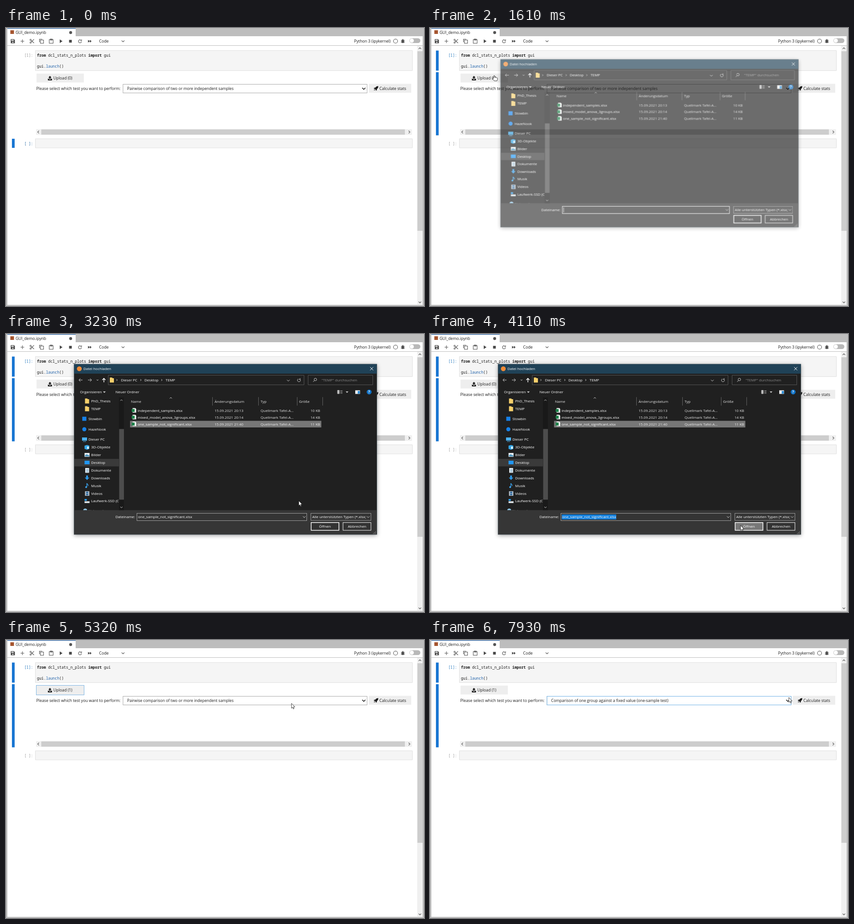
These frames come from a looping animation (918x610 px, 8 s). An HTML page:

```html
<!DOCTYPE html>
<html lang="en">
<head>
<meta charset="utf-8">
<title>Notebook upload demo</title>
<style>
html, body { margin: 0; width: 100%; height: 100%; overflow: hidden; background: #fff; }
svg { display: block; width: 100vw; height: 100vh; }
text { font-family: "Open Sans", "Noto Sans", sans-serif; font-size: 8.7px; fill: #1c1c1c; white-space: pre; }
.mono text { font-family: "Noto Sans Mono", "DejaVu Sans Mono", monospace; font-size: 8.18px; }
.line { fill: none; stroke: #555; stroke-width: 1.1; }
.solid { fill: #4a4a4a; }
.end { text-anchor: end; }
.mid { text-anchor: middle; }

#dialog text { font-size: 8px; fill: #fff; }
#dialog .dim, #dialog .dim text { fill: #b4b4b4; }
#dialog .line { stroke: #d0d0d0; stroke-width: 1; }
#dialog .box { fill: none; stroke: #555; }
#frame { filter: drop-shadow(0 2px 5px rgba(0, 0, 0, .4)); }

/* 1% of the loop is 80 ms */
.anim { animation: 8s step-end infinite; }
.hid { opacity: 0; }
.cell-on { animation-name: show-cell; }
.cell-off { animation-name: hide-cell; }
#prompt1 { fill: #9c9c9c; animation-name: prompt-on; }
#prompt2 { fill: #2f6fa8; animation-name: prompt-off; }
#hover { animation-name: hover; }
#focus { animation-name: focus; }
.before-upload { animation-name: hide-upload; }
.after-upload { animation-name: show-upload; }
#select-focus { animation-name: select-focus; }
.old-test { animation-name: hide-test; }
.new-test { animation-name: show-test; }
#list { animation-name: list; }
#option-bar { animation-name: option; }
#opt1 { fill: #fff; animation-name: option1; }
#opt2 { animation-name: option2; }
#dialog { transform-origin: 481.75px 253px; animation-name: dialog; }
#title-icon { animation-name: hide-icon; }
#title { animation-name: title; }
#row-hover { animation-name: row-hover; }
#row-picked, #filename { animation-name: picked; }
#caret { animation-name: caret; }
#field { stroke: #fff; animation-name: field; }
#marked { animation-name: marked; }
#open { animation-name: open; }
#cursor { transform: translate(-40px, -40px); animation-name: cursor; }
#arrow { animation-name: arrow; }
#hand { animation-name: hand; }

@keyframes show-cell { 15.125% { opacity: 1 } 100% { opacity: 1 } }
@keyframes hide-cell { 15.125% { opacity: 0 } 100% { opacity: 0 } }
@keyframes prompt-on { 15.125% { fill: #307fc1 } 100% { fill: #307fc1 } }
@keyframes prompt-off { 15.125% { fill: #9c9c9c } 100% { fill: #9c9c9c } }
@keyframes hover { 8.75% { opacity: 1 } 17.625% { opacity: 0 } }
@keyframes focus { 15.125% { opacity: 1 } 17.625% { opacity: 0 } 56.5% { opacity: 1 } 71.5% { opacity: 0 } }
@keyframes show-upload { 56.5% { opacity: 1 } 100% { opacity: 1 } }
@keyframes hide-upload { 56.5% { opacity: 0 } 100% { opacity: 0 } }
@keyframes select-focus { 71.5% { opacity: 1 } 100% { opacity: 1 } }
@keyframes show-test { 87.875% { opacity: 1 } 100% { opacity: 1 } }
@keyframes hide-test { 87.875% { opacity: 0 } 100% { opacity: 0 } }
@keyframes list { 71.5% { opacity: 1 } 87.875% { opacity: 0 } }
@keyframes option { 79.25% { transform: translateY(19px) } 100% { transform: translateY(19px) } }
@keyframes option1 { 79.25% { fill: #1c1c1c } 100% { fill: #1c1c1c } }
@keyframes option2 { 79.25% { fill: #fff } 100% { fill: #fff } }
@keyframes dialog {
  17.625% { opacity: .06; transform: scale(.92) }
  18.875% { opacity: .34; transform: scale(.96) }
  20.125% { opacity: .66; transform: scale(.984) }
  21.375% { opacity: .92; transform: scale(.996) }
  22.625% { opacity: 1; transform: scale(1) }
  52.75% { opacity: .86; transform: scale(.994) }
  54.125% { opacity: .57; transform: scale(.981) }
  55.375% { opacity: .2; transform: scale(.95) }
  56.5%, 100% { opacity: 0; transform: scale(.92) }
}
@keyframes hide-icon { 52.75% { opacity: 0 } 100% { opacity: 0 } }
@keyframes title { 52.75% { transform: translateX(-14px) } 100% { transform: translateX(-14px) } }
@keyframes row-hover { 31.25% { opacity: 1 } 35% { opacity: 0 } }
@keyframes picked { 35% { opacity: 1 } 100% { opacity: 1 } }
@keyframes caret { 27.75% { opacity: 0 } 31.25% { opacity: 1 } 35%, 100% { opacity: 0 } }
@keyframes field { 37.75% { stroke: #a0a0a0 } 100% { stroke: #a0a0a0 } }
@keyframes marked { 48.875% { opacity: 1 } 100% { opacity: 1 } }
@keyframes open { 46.5% { fill: #555 } 48.875% { fill: #777 } 100% { fill: #777 } }
@keyframes cursor {
  3.75% { transform: translate(285px, 119px); animation-timing-function: steps(3) }
  7.5% { transform: translate(185px, 86px); animation-timing-function: steps(2) }
  10% { transform: translate(141px, 104px) }
  25.25% { transform: translate(165px, 112px); animation-timing-function: steps(6) }
  32.5% { transform: translate(450px, 192px) }
  37.75% { transform: translate(498px, 232px); animation-timing-function: steps(2) }
  40.375% { transform: translate(643px, 366px); animation-timing-function: steps(2) }
  42.875% { transform: translate(788px, 398px); animation-timing-function: steps(4) }
  47.625% { transform: translate(682px, 420px) }
  60.25% { transform: translate(679px, 396px); animation-timing-function: steps(5) }
  66.5% { transform: translate(627px, 139px); animation-timing-function: steps(3) }
  70.25% { transform: translate(575px, 130px) }
  74% { transform: translate(573px, 133px); animation-timing-function: steps(6) }
  81.75% { transform: translate(552px, 160px) }
  84.125% { transform: translate(560px, 163px) }
  95.5% { transform: translate(604px, 157px); animation-timing-function: steps(3) }
  99.125%, 100% { transform: translate(788px, 126px) }
}
@keyframes arrow { 8.75% { opacity: 0 } 25.25% { opacity: 1 } }
@keyframes hand { 8.75% { opacity: 1 } 25.25% { opacity: 0 } }
</style>
</head>
<body>
<svg viewBox="0 0 918 610" preserveAspectRatio="none">
  <defs>
    <path id="down" d="M-3 -1.5 0 1.5 3 -1.5" fill="none"/>
    <path id="tri" d="M-3 -1.5H3L0 1.7Z" fill="#ccc"/>
    <path id="folder" d="M0 0H5L6 1.5H9V11H0Z" fill="#f5cf6b"/>
    <g id="sheet"><path d="M2 0H8L10 2V10H2Z" fill="#f4f4f4"/><rect y="2" width="6.5" height="6.5" fill="#1d8049"/></g>
    <clipPath id="tree-clip"><rect x="150" y="139" width="97.5" height="247.5"/></clipPath>
  </defs>

  <!-- window -->
  <rect width="918" height="610" fill="#bdbdbd"/>
  <rect x="3" y="18" width="912" height="589.5" fill="#fff"/>
  <path d="M3 0H153V18H3Z" fill="#fff"/>
  <path d="M3 0H153V1.4H3Z" fill="#3f6ea5"/>
  <rect x="9.5" y="5" width="8" height="8" fill="#a5552f"/>
  <text x="21" y="13.3" font-size="8.64">GUI_demo.ipynb</text>
  <circle cx="142" cy="10" r="3.2" fill="#555"/>
  <path d="M3 38.5H915" stroke="#bdbdbd"/>

  <!-- toolbar -->
  <path class="solid" fill-rule="evenodd" d="M10.5 24.5H17.5L19.5 26.5V33.5H10.5ZM12 25.7V28H16.8V25.7ZM15 29.7a1.4 1.4 0 1 0 .1 0Z"/>
  <path class="line" d="M36 25V33M32 29H40" stroke-width="1.3"/>
  <g class="line"><circle cx="54" cy="26" r="1.5"/><circle cx="54" cy="32" r="1.5"/><path d="M55 27 61.5 33M55 31 61.5 24.7"/></g>
  <path class="line" d="M73.5 31V24.5H80M75.5 26.5H82.5V33.5H75.5Z"/>
  <path class="line" d="M95 25.5H103.5V33.5H95ZM97 25.5V24H101.5V26.5H97"/>
  <path class="solid" d="M118 25 124 29 118 33ZM138.5 26H144.5V32H138.5ZM180 26 184 29 180 32ZM184 26 188 29 184 32Z"/>
  <path class="line" d="M164.7 26.6A3.4 3.4 0 1 0 165.8 30M166 25V28H163"/>
  <text x="204.5" y="32" font-size="8.5">Code</text>
  <use href="#down" x="257" y="29" class="line"/>
  <text x="764.5" y="32.2" font-size="8.64">Python 3 (ipykernel)</text>
  <circle cx="855.5" cy="28.7" r="4.5" class="line"/>
  <ellipse cx="871.5" cy="29.3" rx="2.7" ry="3.8" class="solid"/>
  <path class="line" d="M867.5 27H875.5M867.5 29.3H875.5M867.5 31.6H875.5M869.8 25 873.2 25"/>
  <rect x="886" y="22.5" width="24" height="10.5" rx="5.2" fill="#b8b8b8"/>
  <circle cx="891.2" cy="27.7" r="4.5" fill="#fff"/>

  <!-- page scrollbar -->
  <rect x="903" y="39" width="12" height="568.5" fill="#f0f0f0"/>
  <rect x="903.5" y="51" width="11.5" height="394" fill="#cdcdcd"/>
  <path class="line" d="M906.3 46 909 43.3 911.7 46M906.3 600.5 909 603.2 911.7 600.5" stroke-width="1.4"/>

  <!-- cells -->
  <g fill="#f5f5f5" stroke="#e0e0e0"><path d="M64.5 49.5H892.5V93.5H64.5ZM64.5 243H892.5V263H64.5Z"/></g>
  <path class="anim cell-off" d="M13 243H19V263H13Z" fill="#1976d2"/>
  <path class="anim hid cell-on" d="M13 49.5H19V93.5H13ZM13 97H19V235.5H13Z" fill="#1976d2"/>
  <g class="mono">
    <text id="prompt1" class="anim end" x="59.5" y="63">[1]:</text>
    <text id="prompt2" class="anim end" x="59.5" y="256.5">[ ]:</text>
    <text x="68" y="62.7"><tspan font-weight="700">from</tspan> dcl_stats_n_plots <tspan font-weight="700">import</tspan> gui</text>
    <text x="68" y="86.7">gui.<tspan fill="#1c5fa8">launch</tspan>()</text>
  </g>

  <!-- widgets -->
  <rect id="hover" class="anim hid" x="66.3" y="100.5" width="105.4" height="20.5" fill="#cfcfcf"/>
  <rect x="67" y="100" width="104" height="19.5" fill="#eee"/>
  <rect id="focus" class="anim hid" x="66.5" y="99.5" width="105" height="21" fill="#eee" stroke="#7db5e3"/>
  <path d="M96.5 105 100 109H97.8V112H95.2V109H93ZM92 111H94.3V113H98.7V111H101V115H92Z" fill="#1c1c1c"/>
  <text class="anim before-upload" x="104" y="113.2" font-size="8.8">Upload (0)</text>
  <text class="anim hid after-upload" x="104" y="113.2" font-size="8.8">Upload (1)</text>
  <text x="66.5" y="136.3" style="font-size:8.77px">Please select which test you want to perform:</text>
  <rect x="257" y="123.5" width="536" height="19" fill="#fff" stroke="#a8a8a8"/>
  <rect id="select-focus" class="anim hid" x="257" y="123.5" width="536" height="19" fill="#fff" stroke="#6fb1e6"/>
  <g style="--s:8.6px">
    <text class="anim old-test" x="266" y="136.3" style="font-size:8.58px">Pairwise comparison of two or more independent samples</text>
    <text class="anim hid new-test" x="266" y="136.3" style="font-size:8.58px">Comparison of one group against a fixed value (one-sample test)</text>
  </g>
  <path d="M782.3 131.3 785.8 134.8 789.3 131.3" fill="none" stroke="#111" stroke-width="1.5"/>
  <rect x="797" y="122.5" width="93" height="19.5" fill="#eee"/>
  <path d="M817.5 127.5C814 127.5 812.5 129 811 131H808.7L807.7 133.3 810 133.5 812 135.5 812.2 137.5 814.5 136.3V134C816.5 132.5 817.8 131 817.5 127.5ZM809 134.2 808 137 811 136Z" fill="#1c1c1c"/>
  <text x="820" y="136" style="font-size:8.77px">Calculate stats</text>
  <rect x="66" y="222" width="825.5" height="12.5" fill="#f0f0f0"/>
  <rect x="77.5" y="222.5" width="798.5" height="11.5" fill="#cdcdcd"/>
  <path class="line" d="M72.5 225.5 69.5 228.3 72.5 231.1M884.2 225.5 887.2 228.3 884.2 231.1" stroke-width="1.4"/>

  <!-- open list of tests -->
  <g id="list" class="anim hid">
    <rect x="257.5" y="143" width="536" height="58" fill="#fff" stroke="#b5b5b5" style="filter:drop-shadow(1px 1px 1px #0003)"/>
    <rect id="option-bar" class="anim" x="258" y="143.5" width="535" height="19" fill="#0078d7"/>
    <text id="opt1" class="anim" x="266" y="156" style="font-size:8.58px">Pairwise comparison of two or more independent samples</text>
    <text id="opt2" class="anim" x="266" y="175" style="font-size:8.58px">Comparison of one group against a fixed value (one-sample test)</text>
    <text x="266" y="194" style="font-size:8.58px">Mixed-model ANOVA</text>
  </g>

  <!-- file dialog -->
  <g id="dialog" class="anim hid">
    <rect id="frame" x="149.5" y="66" width="665" height="374" fill="#202020"/>
    <rect x="149.5" y="66" width="665" height="21" fill="#204257"/>
    <rect x="149.5" y="386.5" width="665" height="53.5" fill="#363636"/>
    <rect x="149.5" y="66" width="665" height="374" fill="none" stroke="#4b5a62" stroke-width=".7"/>
    <circle id="title-icon" class="anim" cx="161" cy="76.2" r="5.3" fill="#f08a35"/>
    <text id="title" class="anim" x="170" y="79.3">Datei hochladen</text>
    <path d="M799.7 72.7 806.5 79.5M806.5 72.7 799.7 79.5" stroke="#fff"/>

    <path class="line" d="M168 101H160M163.5 97.5 160 101 163.5 104.5M180 101H188M184.5 97.5 188 101 184.5 104.5"/>
    <path d="M215 106V97.5M211.5 101 215 97.3 218.5 101" fill="none" stroke="#fff" stroke-width="1.4"/>
    <path class="box" d="M224.5 90.5H654.5V111.5H224.5ZM663.5 90.5H805.5V111.5H663.5Z"/>
    <use href="#folder" x="228" y="95.5"/>
    <path class="line" d="M242.5 99 244.5 101 242.5 103M295 99 297 101 295 103M341 99 343 101 341 103M199 100 201 102 203 100"/>
    <text x="252.5" y="104">Dieser PC</text><text x="304" y="104">Desktop</text><text x="350.5" y="104">TEMP</text>
    <use href="#down" x="620" y="102" class="line"/>
    <path class="line" d="M645.5 99A3.3 3.3 0 1 1 642 98.5M645.8 97V99.5H643"/>
    <circle cx="679.5" cy="99.8" r="2.8" class="line"/><path class="line" d="M677.5 102 674.5 105"/>
    <text class="dim" x="693" y="104" style="fill:#8c8c8c">"TEMP" durchsuchen</text>

    <text x="162.5" y="130">Organisieren</text><use href="#tri" x="216" y="127.5"/>
    <text x="240.5" y="130">Neuer Ordner</text>
    <path d="M728 123.5H732V131H728ZM734 124.5H739M734 127.3H739M734 130H739" stroke="#bbb" fill="#bbb" stroke-width=".9"/>
    <use href="#tri" x="749" y="127.5"/>
    <path d="M767 123.5H777.5V131.5H767Z" fill="#f0f0f0"/><path d="M772.5 125H777V131H772.5Z" fill="#2d8ed8"/>
    <circle cx="797.5" cy="127.3" r="5.4" fill="#1173c7"/><text class="mid" x="797.5" y="130.2" font-weight="700">?</text>

    <!-- folder tree -->
    <g clip-path="url(#tree-clip)">
      <rect x="150" y="274" width="98" height="16.5" fill="#3a3a3a"/>
      <use href="#folder" x="173.5" y="141.5"/><use href="#folder" x="173.5" y="158.5"/>
      <rect x="167.5" y="181.5" width="9" height="9" fill="#1681e8"/>
      <circle cx="172" cy="209" r="4.5" fill="#1681e8"/>
      <path d="M167 227H178V234H167ZM169 235.5H176V236.5H169Z" fill="#4ab0ee"/>
      <path d="M172.5 245 178 243.5 183 245V252L178 254 172.5 252Z" fill="#35a7e8"/><path d="M178 247H182V252H178Z" fill="#d9f0fb"/>
      <path d="M172.5 261H183.5V269.5H172.5Z" fill="#e8eef2"/><path d="M173.5 266 177 264 183 266.5V268.5H173.5Z" fill="#4892bb"/>
      <path d="M172.5 278H183.5V286H172.5Z" fill="#2196f3"/>
      <path d="M174 294H182.5V304.5H174Z" fill="#e6edf2"/><path d="M176 297H181M176 299.5H181M176 302H181" stroke="#5c94b8"/>
      <path d="M176 310.5H180V315H183L178 320.5 173 315H176Z" fill="#2e96e3"/>
      <path d="M177.5 336V327.5C178 330 181.5 330 180.5 333.5" fill="none" stroke="#3aa3ed" stroke-width="1.4"/><circle cx="176" cy="336" r="2" fill="#3aa3ed"/>
      <path d="M173.5 345H183V355H173.5Z" fill="#bac4ce"/><path d="M175.7 346H180.8V349.5H175.7ZM175.7 350.5H180.8V354H175.7Z" fill="#346c9e"/>
      <path d="M172.5 367H183.5V371H172.5Z" fill="#d5dce0"/><rect x="172.5" y="362" width="5" height="4" fill="#2b9be8"/>
      <circle cx="174" cy="387.5" r="4.5" fill="#8fc6e6"/>
      <text x="187" y="149.5">PhD_Thesis</text><text x="187" y="166.5">TEMP</text>
      <text x="181" y="189">Stowbin</text><text x="181" y="212">HazeNook</text><text x="181" y="234">Dieser PC</text>
      <text x="187" y="251">3D-Objekte</text><text x="187" y="268">Bilder</text><text x="187" y="285">Desktop</text>
      <text x="187" y="301.8">Dokumente</text><text x="187" y="318.7">Downloads</text><text x="187" y="335.5">Musik</text>
      <text x="187" y="352.5">Videos</text><text x="187" y="369.3">Laufwerk-SSD (C:)</text><text x="181" y="391">Netzwerk</text>
    </g>
    <rect x="248" y="139" width="11" height="247.5" fill="#191919"/>
    <rect x="248.5" y="208.5" width="10.5" height="155" fill="#4d4d4d"/>
    <path class="line" d="M251 146.5 253.5 144 256 146.5M251 379 253.5 381.5 256 379"/>

    <!-- file list -->
    <path d="M453.5 138.5V157M554.5 138.5V157M639.5 138.5V157M695.5 138.5V157" stroke="#636363"/>
    <path class="line" d="M359.5 141.5 362 139.2 364.5 141.5"/>
    <g class="dim"><text x="274.5" y="150.5" style="fill:#e4e4e4">Name</text><text x="458" y="150.5" style="fill:#e4e4e4">Änderungsdatum</text><text x="559" y="150.5" style="fill:#e4e4e4">Typ</text><text x="643.5" y="150.5" style="fill:#e4e4e4">Größe</text></g>
    <rect id="row-hover" class="anim hid" x="272.5" y="190.5" width="420" height="14.5" fill="#4d4d4d"/>
    <rect id="row-picked" class="anim hid" x="272.5" y="190.5" width="420" height="14.5" fill="#777"/>
    <use href="#sheet" x="276" y="162.5"/><use href="#sheet" x="276" y="177.3"/><use href="#sheet" x="276" y="192.3"/>
    <text x="289" y="170.8">independent_samples.xlsx</text>
    <text x="289" y="185.6">mixed_model_anova_3groups.xlsx</text>
    <text x="289" y="200.5">one_sample_not_significant.xlsx</text>
    <g style="opacity:.87">
      <text x="458" y="170.8">15.09.2021 20:13</text><text x="559" y="170.8">Quellmark Tafel-A...</text><text class="end" x="690" y="170.8">10 KB</text>
      <text x="458" y="185.6">15.09.2021 20:14</text><text x="559" y="185.6">Quellmark Tafel-A...</text><text class="end" x="690" y="185.6">14 KB</text>
      <text x="458" y="200.5">15.09.2021 21:40</text><text x="559" y="200.5">Quellmark Tafel-A...</text><text class="end" x="690" y="200.5">11 KB</text>
    </g>

    <!-- file name and buttons -->
    <text class="end" x="283.5" y="404">Dateiname:</text>
    <rect id="field" class="anim" x="287.5" y="393.5" width="373" height="16" fill="#343434"/>
    <path id="caret" class="anim" d="M290.5 396V407" stroke="#fff" stroke-width=".8"/>
    <rect id="marked" class="anim hid" x="289.5" y="396" width="119.5" height="11" fill="#1580dc"/>
    <text id="filename" class="anim hid" x="290" y="404.2">one_sample_not_significant.xlsx</text>
    <use href="#down" x="655" y="401.5" class="line"/>
    <rect x="669.5" y="393.5" width="132" height="15.5" fill="#343434" stroke="#9c9c9c"/>
    <text x="672.5" y="404">Alle unterstützten Typen (*.xlsx;</text>
    <use href="#down" x="795.5" y="401.5" class="line"/>
    <rect id="open" class="anim" x="670.2" y="413.7" width="61" height="17" fill="#333" stroke="#fff" stroke-width="1.5"/>
    <rect x="740.2" y="413.7" width="61.3" height="17" fill="#333" stroke="#dcdcdc" stroke-width="1.2"/>
    <text class="mid" x="700.5" y="425">Öffnen</text><text class="mid" x="771" y="425">Abbrechen</text>
    <path d="M806 438H812M808.5 435.8H812M811 433.5H812" stroke="#aaa" stroke-width="1.2" stroke-dasharray="1.2"/>
  </g>

  <g id="cursor" class="anim" fill="#fff" stroke="#111" stroke-width=".8" stroke-linejoin="round">
    <path id="arrow" class="anim" d="M0 0V10.8L2.4 8.5 4 12.3 5.7 11.6 4.1 7.9H7.5Z"/>
    <path id="hand" class="anim hid" d="M-1 6.5V1Q0 -.5 1.2 1V4.3Q2.4 3.6 3.3 4.7 4.5 4 5.3 5.2 6.7 4.6 7.2 6V8.5L6 12H.2L-3.6 7.2Q-3 5.2 -1 6.5Z"/>
  </g>
</svg>
</body>
</html>
```
